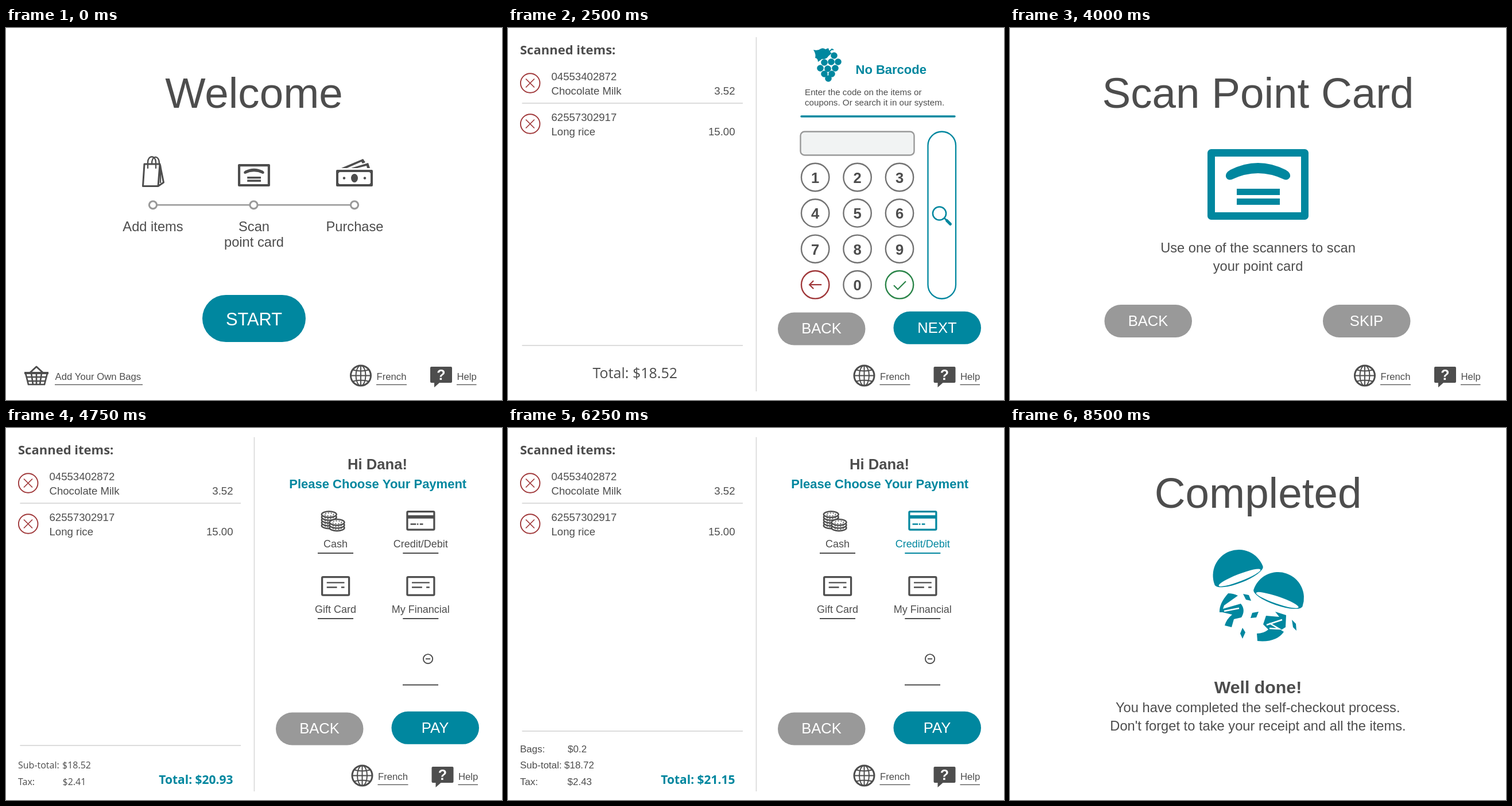
Recreate the animation shown at these times as an HTML page with a canvas. Size 864 px wide and 648 px high, loop 9250 ms.

```html
<!DOCTYPE html>
<html lang="en">
<head>
<meta charset="utf-8">
<title>Self-checkout</title>
<style>
html, body { margin: 0; width: 100%; height: 100%; overflow: hidden; background: #fff; }
canvas { display: block; }
</style>
</head>
<body>
<canvas id="stage" width="864" height="648"></canvas>
<script>
const ctx = document.getElementById('stage').getContext('2d');
const TEAL = '#00879f', INK = '#4d4d4d', GRAY = '#999', RED = '#a0383a', GREEN = '#2b8549', RULE = '#dcdcdc';
const SANS = '"Liberation Sans", Arial, sans-serif';
const HUMANIST = '"Open Sans", "Noto Sans", sans-serif';

function text(str, x, y, size, { color = INK, align = 'left', bold = false, font = SANS } = {}) {
  ctx.font = `${bold ? 'bold ' : ''}${size}px ${font}`;
  ctx.textAlign = align;
  ctx.fillStyle = color;
  ctx.fillText(str, x, y);
}

function centered(str, x, y, size, options = {}) {
  text(str, x, y, size, { ...options, align: 'center' });
}

function fill(path, color) {
  ctx.fillStyle = color;
  ctx.fill(new Path2D(path));
}

function stroke(path, color, width, cap = 'butt') {
  ctx.strokeStyle = color;
  ctx.lineWidth = width;
  ctx.lineCap = cap;
  ctx.lineJoin = cap === 'round' ? 'round' : 'miter';
  ctx.stroke(new Path2D(path));
}

function oval(x, y, rx, ry, fillColor, strokeColor, width, angle = 0) {
  ctx.beginPath();
  ctx.ellipse(x, y, rx, ry, angle, 0, Math.PI * 2);
  paint(fillColor, strokeColor, width);
}

function circle(x, y, r, ...style) {
  oval(x, y, r, r, ...style);
}

function box(x, y, w, h, r, ...style) {
  ctx.beginPath();
  ctx.roundRect(x, y, w, h, r);
  paint(...style);
}

function paint(fillColor, strokeColor, width) {
  if (fillColor) { ctx.fillStyle = fillColor; ctx.fill(); }
  if (strokeColor) { ctx.strokeStyle = strokeColor; ctx.lineWidth = width; ctx.stroke(); }
}

function at(x, y, draw, scale = 1, angle = 0) {
  ctx.save();
  ctx.translate(x, y);
  ctx.rotate(angle);
  ctx.scale(scale, scale);
  draw();
  ctx.restore();
}

function button(label, x, y, color = GRAY) {
  box(x, y, 152.5, 57, 28.5, color);
  centered(label, x + 76, y + 36.7, 25.6, { color: '#fff' });
}

// Icons

function pointCard(color) {
  box(6.5, 6.5, 163, 110, 0, null, color, 13);
  fill('M40 36Q88 12 136 36Q145 41 144 48Q141 55 134 53Q88 31 42 53Q34 55 32 48Q31 41 40 36Z', color);
  box(51, 69, 75, 11, 0, color);
  box(51, 86, 75, 11, 0, color);
}

function shoppingBag() {
  stroke('M241 237H268L265 275.5H238.5ZM268 237L274.5 269L265 275.5', INK, 3, 'round');
  stroke('M269 239V270', INK, 2.4);
  stroke('M247 244V234C247 221 261 221 261 234V244M254 237C253 222 267 220 267 236', INK, 2.3, 'round');
}

function banknotes() {
  box(577, 249, 60, 25, 0, null, INK, 4);
  oval(607, 261.5, 6, 7.5, INK);
  for (const x of [589, 625]) circle(x, 261.5, 2.2, INK);
  fill('M577 249H583L577 255ZM637 249H631L637 255ZM577 274H583L577 268ZM637 274H631L637 268Z', INK);
  fill('M584 244L622 228L626 234L621 236L619 233L594 244Z', INK);
  fill('M601 244L631 235L634 244H629L628 240L612 244Z', INK);
}

function basket() {
  stroke('M34 601H72L67 621H39ZM36 608H70M38 615H68M44 601L47 621M53 601V621M62 601L59 621', INK, 2.7);
  stroke('M41 601L53 590L65 601', INK, 3, 'round');
  stroke('M32 601H74', INK, 4);
}

function globe() {
  circle(0, 0, 17.5, null, INK, 3);
  oval(0, 0, 8.5, 17.5, null, INK, 2);
  stroke('M0-17V17M-17 0H17M-14-10Q0-6 14-10M-14 10Q0 6 14 10', INK, 2);
}

function helpBubble() {
  fill('M2 0H36Q38 0 38 2V26Q38 28 36 28H16L7 36V28H2Q0 28 0 26V2Q0 0 2 0Z', INK);
  centered('?', 19, 22.5, 25, { color: '#fff', bold: true });
}

function grapes(color) {
  fill('M532 38Q540 40 545 36Q549 34 553 37L558 35Q560 42 564 44L558 49Q555 55 547 54L540 59Q540 53 535 52Q537 46 532 38Z', color);
  const fruit = [[568, 48], [551, 60], [563, 59], [575, 59], [544, 70], [557, 71], [570, 70], [551, 80], [564, 80], [558, 88]];
  for (const [x, y] of fruit) circle(x, y, 5.8, color);
  stroke('M558 43L564 37L567 38', color, 2);
}

function creditCard(color) {
  box(2, 2, 58, 39, 2, null, color, 4);
  box(1, 10, 60, 7, 0, color);
  stroke('M9 29H21M23 29H26M29 29H36', color, 3);
}

function coins(color) {
  const stack = (x, y, levels) => {
    for (let i = levels; i >= 0; i--) {
      oval(x, y + i * 6, 16, 6.5, '#fff', color, 3);
      ctx.setLineDash([3, 3]);
      oval(x, y + i * 6, 10, 3, null, color, 1.6);
      ctx.setLineDash([]);
    }
  };
  stack(17, 8, 4);
  stack(34, 25, 2);
}

function bowl() {
  ctx.beginPath();
  ctx.arc(0, 0, 45, Math.PI, 0);
  ctx.ellipse(0, 0, 45, 13, 0, 0, Math.PI);
  ctx.fillStyle = TEAL;
  ctx.fill();
  oval(0, 4, 39, 6.3, '#fff');
}

function party() {
  at(398.5, 257, bowl, 1, -0.37);
  at(467, 296, bowl, 1, 0.33);
  fill('M365 321Q364 306 380 288Q389 288 397 292L373 309L371 315L402 306Q411 317 403 330L390 333L386 347L374 344Q377 333 387 325L370 321Z', TEAL);
  stroke('M373 319L399 314', '#fff', 2.5);
  fill('M430 358Q442 358 450 351L441 342L446 327L469 329L462 320L481 326L480 347L472 352L477 355Q464 374 431 371Z', TEAL);
  stroke('M447 343L474 334M452 349L469 350L452 340', '#fff', 2.5);
  fill('M406 289L416 291L420 301L411 299ZM419 331L422 322L433 320L429 330ZM405 348L410 356L405 367L401 358ZM491 334L498 341L499 353L493 347Z', TEAL);
}

// Shared screen parts

function footer(dx = 0) {
  at(618 + dx, 605.5, globe);
  at(739 + dx, 590, helpBubble);
  underlined('French', 645.5 + dx, 53);
  underlined('Help', 785.5 + dx, 34.5);
}

function underlined(label, x, width) {
  text(label, x, 613, 16.7);
  stroke(`M${x - 0.5} 621.3h${width}`, INK, 1.2);
}

function heading(label) {
  centered(label, 432, 139, 74.6);
}

function panels(ruleY = 553) {
  stroke('M432.5 16V633', RULE, 1.8);
  stroke(`M24.5 ${ruleY}H409`, RULE, 1.8);
  footer(2.5);
}

function itemList() {
  text('Scanned items:', 21, 46, 22, { bold: true, font: HUMANIST });
  const items = [['04553402872', 'Chocolate Milk', '3.52'], ['62557302917', 'Long rice', '15.00']];
  items.forEach(([code, name, price], i) => at(0, i * 71, () => {
    circle(38.7, 96, 16.8, null, RED, 1.9);
    stroke('M31 88.5L46 103.5M46 88.5L31 103.5', RED, 1.7);
    text(code, 75.5, 91, 18.6);
    text(name, 75.5, 116, 18.6);
    text(price, 395.5, 116, 18.6, { align: 'right' });
  }));
  stroke('M24.5 131H409', RULE, 1.8);
}

function runningTotal(amount) {
  text(`Total: ${amount}`, 147.5, 610, 25, { font: HUMANIST });
}

function section(title, lines, accent, dy = 0, icon) {
  at(0, dy, () => {
    if (icon) icon(accent);
    text(title, 605.5, 80, 22, { bold: true, color: accent });
    lines.forEach((line, i) => text(line, 517, 117 + i * 18, 15.2));
    stroke('M511 154H778', accent, 3.4, 'round');
  });
}

const CODE_HINT = ['Enter the code on the items or', 'coupons. Or search it in our system.'];
const SCAN_HINT = ['Use one of our two scanners to scan', 'the barcode of the items or coupons.'];

function popup(title) {
  ctx.fillStyle = 'rgba(72, 72, 72, .775)';
  ctx.fillRect(0, 0, 864, 648);
  box(131, 104.5, 602, 400, 16, '#fff');
  centered(title, 432.5, 192, 46.6, { font: HUMANIST });
}

// Screens

function welcome() {
  heading('Welcome');
  shoppingBag();
  at(404, 237, () => pointCard(INK), 0.318);
  banknotes();
  stroke('M256 308.3H607', GRAY, 2.6);
  for (const x of [256, 431.5, 607]) circle(x, 308.3, 6.6, '#fff', GRAY, 3.1);
  centered('Add items', 256, 353.5, 23.7);
  centered('Scan', 432, 353.5, 23.7);
  centered('point card', 432, 381, 23.7);
  centered('Purchase', 607.5, 353.5, 23.7);
  box(342, 465, 180, 82, 41, TEAL);
  centered('START', 432, 518, 30.8, { color: '#fff' });
  basket();
  underlined('Add Your Own Bags', 85.5, 153);
  footer();
}

function scanPanel() {
  section('With Barcode', SCAN_HINT, TEAL);
  section('No Barcode', CODE_HINT, '#777', 167, grapes);
  button('CANCEL', 470, 495.5);
  button('NEXT', 671.5, 495.5, TEAL);
}

function emptyCart() {
  panels();
  runningTotal('$0.00');
  scanPanel();
}

function fullCart() {
  panels();
  itemList();
  runningTotal('$18.52');
  scanPanel();
}

function scanned() {
  fullCart();
  popup('SCANNED');
  circle(432, 289.7, 52.7, null, TEAL, 7);
  stroke('M412.5 291L425 303L451.5 276', TEAL, 7.5, 'round');
  centered('Long Rice', 432, 403, 33.8, { bold: true });
  centered('$15.00', 432, 459, 33.8, { bold: true });
}

function keypad() {
  panels();
  itemList();
  runningTotal('$18.52');
  section('No Barcode', CODE_HINT, TEAL, 0, grapes);
  box(509.5, 180.5, 198, 41, 7, '#f1f3f3', GRAY, 2.4);
  [...'123456789<0+'].forEach((key, i) => {
    const x = 535.2 + (i % 3) * 73.4, y = 260 + Math.floor(i / 3) * 62.4;
    const color = { '<': RED, '+': GREEN }[key] || '#737373';
    circle(x, y, 24.2, null, color, 2.4);
    at(x, y, () => {
      if (key === '<') stroke('M11 0H-10M-3-7L-10 0L-3 7', RED, 2.2);
      else if (key === '+') stroke('M-10 1L-3 8L11-6', GREEN, 2.2);
      else centered(key, 0, 9.8, 25.6, { bold: true });
    });
  });
  box(731.5, 180.5, 48.5, 291, 24.2, null, TEAL, 2.3);
  circle(751.5, 323, 11.6, null, TEAL, 2.5);
  stroke('M760 331L764 335', TEAL, 2.5);
  stroke('M764.5 335.5L770.5 341.5', TEAL, 5, 'round');
  button('BACK', 470, 495.5);
  button('NEXT', 671.5, 493.8, TEAL);
}

function reviewItems() {
  keypad();
  popup('CONFIRMATION');
  centered('Have you scanned all the items?', 432, 301, 27);
  button('BACK', 221, 401);
  button('NEXT', 491, 401, TEAL);
}

function scanCard() {
  heading('Scan Point Card');
  at(344, 211, () => pointCard(TEAL));
  centered('Use one of the scanners to scan', 432, 391, 23.7);
  centered('your point card', 432, 423, 23.7);
  button('BACK', 164.5, 482);
  button('SKIP', 545, 482);
  footer();
}

function method(label, x, y, icon, color = INK) {
  at(x - 25, y, () => icon(color), 0.81);
  centered(label, x, y + 64, 18, { color });
  stroke(`M${x - 31} ${y + 74}h62`, color, 1.8);
}

function giftIcon(color) {
  box(2, 2, 58, 39, 2, null, color, 4);
  stroke('M12 14H50M12 24H34M43 24H50', color, 3);
}

function coinIcon(color) {
  circle(47, 20, 10, null, color, 2.4);
  stroke('M42 20H52', color, 2.4);
}

function payment(chosen) {
  panels(chosen ? 528 : 553);
  itemList();
  const font = chosen ? SANS : HUMANIST, size = chosen ? 17 : 16;
  const row = (label, amount, x, y) => {
    text(label, 21, y, size, { font });
    text(amount, x, y, size, { font });
  };
  if (chosen) row('Bags:', '$0.2', 104, 565);
  row('Sub-total:', chosen ? '$18.72' : '$18.52', 98, 593);
  row('Tax:', chosen ? '$2.43' : '$2.41', chosen ? 103.5 : 98.5, 622);
  text(`Total: ${chosen ? '$21.15' : '$20.93'}`, 395.5, 620, 21, { bold: true, font: HUMANIST, color: TEAL, align: 'right' });
  centered('Hi Dana!', 647, 72, 25.6, { bold: true });
  centered('Please Choose Your Payment', 647.7, 105, 22, { bold: true, color: TEAL });
  method('Cash', 574, 144, coins);
  method('Credit/Debit', 722.3, 144, creditCard, chosen ? TEAL : INK);
  method('Gift Card', 574, 258, giftIcon);
  method('My Financial', 722.3, 258, giftIcon);
  at(697, 386, () => coinIcon(INK), 0.81);
  stroke('M691 447.5h62', INK, 1.8);
  button('BACK', 470, 495.5);
  button('PAY', 671.5, 493.8, TEAL);
}

function noMethod() {
  payment(false);
  popup('ERROR');
  centered('Please choose a payment method', 431.5, 301, 27.05);
  button('OK', 356, 401, TEAL);
}

function confirmPayment() {
  payment(true);
  popup('CONFIRMATION');
  at(280, 259, () => coins(INK));
  centered('Total: $21.15', 312, 340, 27.05, { color: TEAL });
  at(524.5, 261.5, () => creditCard(INK));
  centered('Credit/Debit', 555.7, 343, 27.05, { color: TEAL });
  button('BACK', 221, 401);
  button('PAY', 491, 401, TEAL);
}

function paying() {
  payment(true);
  popup('PAYMENT');
  at(385, 257, () => creditCard(TEAL), 1.5);
  centered('Please use the card terminal', 432, 403, 27.05);
}

function completed() {
  heading('Completed');
  party();
  centered('Well done!', 432, 462, 30.3, { bold: true });
  centered('You have completed the self-checkout process.', 431.7, 495, 23.7);
  centered("Don't forget to take your receipt and all the items.", 432, 527, 23.7);
}

const INTRO = 250, STEP = 750;
const screens = [
  welcome, emptyCart, scanned, fullCart, keypad, reviewItems, scanCard,
  () => payment(false), noMethod, () => payment(true), confirmPayment, paying, completed
];
const LOOP = INTRO + STEP * (screens.length - 1);
let start;

function frame(now) {
  start ??= now;
  const time = (now - start) % LOOP;
  const index = time < INTRO ? 0 : 1 + Math.floor((time - INTRO) / STEP);
  ctx.fillStyle = '#fff';
  ctx.fillRect(0, 0, 864, 648);
  screens[index]();
  requestAnimationFrame(frame);
}
requestAnimationFrame(frame);
</script>
</body>
</html>
```
